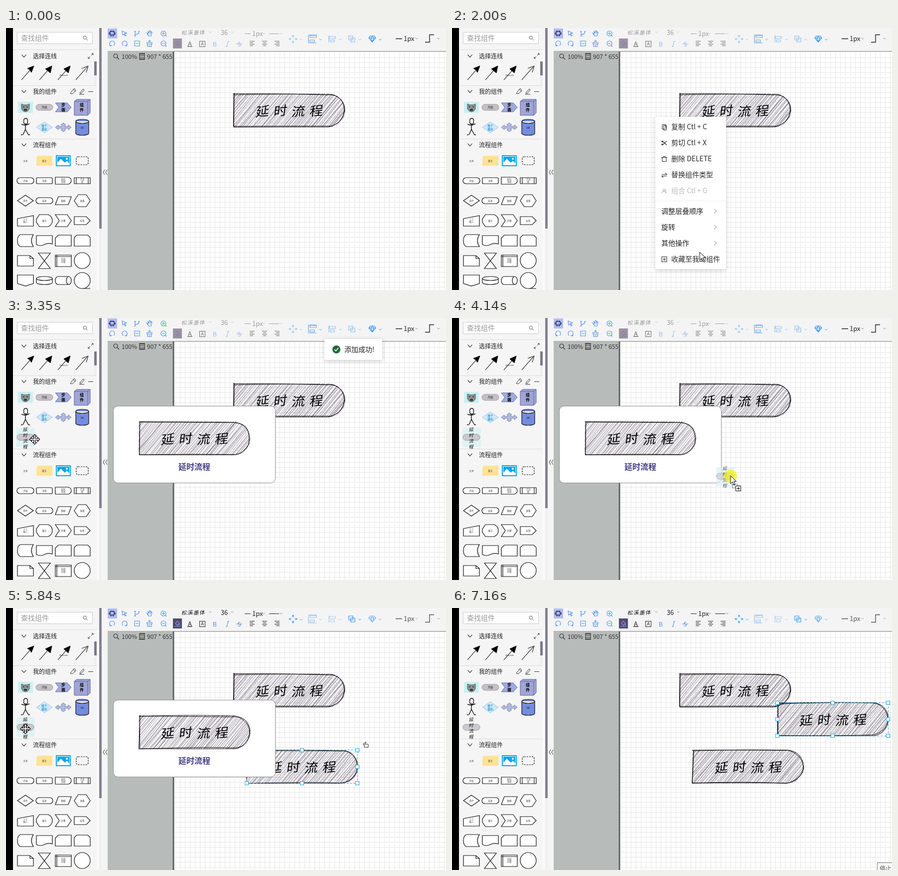
Animation of 883 by 525 pixels, one loop 7240 ms. Source, as an HTML page with a canvas:

```html
<!DOCTYPE html>
<html lang="zh">
<head>
<meta charset="utf-8">
<title>流程图编辑器</title>
<style>
html, body { margin: 0; width: 100%; height: 100%; overflow: hidden; background: #fff; }
canvas { display: block; width: 883px; height: 525px; }
</style>
</head>
<body>
<canvas id="stage" width="883" height="525"></canvas>
<script>
const c = document.getElementById('stage').getContext('2d');
const LOOP = 7240, STEP = 132.5;
const SANS = '"Noto Sans CJK SC", "Noto Sans CJK", "Open Sans", sans-serif';
const BLUE = '#4b8fea', INK = '#222';

function rng(seed) {
  let s = seed * 7919 % 2147483647;
  const next = () => (s = s * 16807 % 2147483647) / 2147483647;
  next(); next();
  return next;
}

function rect(x, y, w, h, fill, stroke) {
  if (fill) { c.fillStyle = fill; c.fillRect(x, y, w, h); }
  if (stroke) { c.strokeStyle = stroke; c.lineWidth = 1; c.strokeRect(x + .5, y + .5, w - 1, h - 1); }
}

function path(d, x, y, stroke, width = 1, fill, scale = 1) {
  const p = new Path2D(d);
  c.save();
  c.translate(x, y);
  c.scale(scale, scale);
  if (fill) { c.fillStyle = fill; c.fill(p); }
  if (stroke) { c.strokeStyle = stroke; c.lineWidth = width; c.stroke(p); }
  c.restore();
}

function text(s, x, y, size, color = INK, align = 'left', weight = 300) {
  c.font = `${weight} ${size}px ${SANS}`;
  c.fillStyle = color;
  c.textAlign = align;
  c.textBaseline = 'middle';
  c.fillText(s, x, y);
}

function brushText(s, x, y, size, pitch, color = '#000', weight = 500) {
  [...s].forEach((ch, i) => {
    c.save();
    c.translate(x + i * pitch, y + (i % 2 ? -1 : 1) * size * .02);
    c.transform(1, -.1, -.12, .94, 0, 0);
    text(ch, 0, 0, size, color, 'center', weight);
    c.restore();
  });
}

function faded(alpha, draw) {
  c.save();
  c.globalAlpha *= alpha;
  draw();
  c.restore();
}

function shadowBox(x, y, w, h, radius) {
  c.save();
  c.shadowColor = 'rgba(0,0,0,.2)';
  c.shadowBlur = 10;
  c.shadowOffsetY = 2;
  c.fillStyle = '#fff';
  c.beginPath();
  c.roundRect(x, y, w, h, radius);
  c.fill();
  c.restore();
}

const chevron = (x, y, color = '#888', s = 1) => path('M-2.5-1.2L0 1.3L2.5-1.2', x, y, color, 1, null, s);
const lens = (x, y, s = 1, color = '#444') =>
  path('M3-1A4 4 0 1 1-5-1A4 4 0 1 1 3-1M2 2L6 6', x, y, color, 1.2, null, s);

// Hand-drawn delay shape, 222 x 66
function sketch(x, y, seed) {
  const r = rng(seed), j = n => (r() - .5) * n;
  c.save();
  c.translate(x, y);
  c.save();
  c.clip(new Path2D('M-1-1H190C209-1 224 14 224 33S209 67 190 67H-1Z'));
  c.strokeStyle = '#5a4d63';
  for (let k = -62; k < 224; k += 4.4) {
    for (let pass = 0; pass < 2; pass++) {
      const a = k + j(5), b = k + 57 + j(5);
      c.globalAlpha = .4 + r() * .35;
      c.lineWidth = .6 + r() * .5;
      c.beginPath();
      c.moveTo(a, 67);
      c.quadraticCurveTo((a + b) / 2 + j(3), 33 + j(3), b, -1);
      c.stroke();
    }
  }
  c.restore();
  c.strokeStyle = '#000';
  c.lineWidth = .9;
  for (let pass = 0; pass < 2; pass++) {
    c.beginPath();
    c.moveTo(j(2), 1 + j(4));
    c.quadraticCurveTo(90 + j(40), j(6), 189 + j(4), 1 + j(3));
    c.bezierCurveTo(207 + j(8), j(4), 222, 15 + j(6), 222 + j(2), 33 + j(5));
    c.bezierCurveTo(222, 51 + j(6), 206 + j(8), 65, 189 + j(6), 65 + j(3));
    c.quadraticCurveTo(100 + j(40), 64 + j(6), j(3), 66 + j(2));
    c.lineTo(1 + j(3), j(3));
    c.stroke();
  }
  c.restore();
  brushText('延时流程', x + 58, y + 34, 27, 36);
}

function dashBox(x, y, color) {
  c.save();
  c.setLineDash([4, 3]);
  rect(x - 1, y - 1, 224, 68, null, color);
  c.restore();
}

function selection(x, y) {
  dashBox(x, y, '#33a0d8');
  for (const dx of [0, 111, 222]) for (const dy of [0, 33, 66])
    if (dx !== 111 || dy !== 33) rect(x + dx - 4, y + dy - 4, 8, 8, '#fff', '#12a9ee');
  path('M-3-1H5V5H-3ZM-5 1Q-6-5 1-4M-1-6L1-4L-1-2', x + 239, y - 11, '#333');
}

const PILL = 'M-11-6H11A6 6 0 0 1 11 6H-11A6 6 0 0 1-11-6Z';
const ARROWS = 'M-16 0L-10-5V-2H-3V-5H-5L0-9L5-5H3V-2H10V-5L16 0L10 5V2H3V5H5L0 9L-5 5H-3V2H-10V5Z';
const STEP_SHAPE = 'M-16-9H8L16 0L8 9H-16L-9 0Z';
const CIRCLE = 'M-16 0A16 16 0 1 1 16 0A16 16 0 1 1-16 0';

const flowShapes = [
  [PILL, '开始'],
  ['M-14-6H14Q16-6 16-4V4Q16 6 14 6H-14Q-16 6-16 4V-4Q-16-6-14-6Z', '流程'],
  ['M-16-7H9A7 7 0 0 1 9 7H-16Z', '延时/流程'],
  ['M-16-6H16V6H-16ZM-12-6V6M12-6V6', '子流/程'],
  ['M-16 0L0-11L16 0L0 11Z', '条件'],
  [PILL, '结束'],
  ['M-10-8H16L10 8H-16Z', '数据'],
  ['M-16 0L-8-12H8L16 0L8 12H-8Z', '准备'],
  ['M-16-4L16-10V11H-16Z', '人工/输入'],
  ['M-10-12H8Q16-8 16 0T8 12H-10L-16 3V-3Z', '展示'],
  ['M-16-12H8L16 0L8 12H-16L-8 0Z', '步骤'],
  ['M-16-8H8L16 0L8 8H-16Z', '标签'],
  ['M-10-12H16Q8 0 16 12H-10Q-16 10-16 0T-10-12Z'],
  ['M-16-10H16V7Q8 4 0 8T-16 8Z'],
  ['M-10-11H16V11H-16V-5Z'],
  ['M-11-11H11L16-6V11H-16V-6Z'],
  ['M-16-10H9L16-4V11H-16ZM9-10V-4H16'],
  ['M-12-15H12L-12 16H12Z'],
  ['M-16-11H16V12H-16ZM-16-8H16M-13-11V12', '内部/存储'],
  [CIRCLE],
  ['M-16-11H16V6L0 11L-16 6Z'],
  ['M-16-4A16 4 0 0 1 16-4V4A16 4 0 0 1-16 4ZM-16-4A16 4 0 0 0 16-4'],
  ['M-11-8H11A5 8 0 0 1 11 8H-11A5 8 0 0 1-11-8M11-8A5 8 0 0 0 11 8'],
  [CIRCLE + 'M0 16H16']
];

function tinyLabel(label, x, y) {
  const rows = label.split('/');
  rows.forEach((s, i) => text(s, x, y + (i - (rows.length - 1) / 2) * 5.5, 4.5, '#444', 'center', 400));
}

function section(title, y) {
  path('M-4.5-2.5L0 2.5L4.5-2.5', 36, y, '#444', 1.2);
  text(title, 54, y, 12, '#222', 'left', 400);
}

function addedItem(dx = 0, dy = 0) {
  path(PILL, 39 + dx, 239 + dy, '#999', 1, '#ccc9cf');
  [...'延时流程'].forEach((ch, i) => brushText(ch, 39 + dx, 223 + dy + i * 11.6, 9.5, 0, '#111', 400));
}

function myComponents() {
  rect(24, 148, 30, 22, '#c9f0f1');
  path('M-8-7L-4-5H4L8-7L8 3Q5 9 0 9T-8 3Z', 39, 159, '#555', 1, '#8b9494');
  path('M-5-1H-2M2-1H5M-2 4H2V6H-2Z', 39, 159, '#222', 1.5);
  path(PILL, 77, 159, '#999', 1, '#c5c0c8');
  text('开始', 77, 159, 5.5, '#222', 'center', 500);
  path(STEP_SHAPE, 115, 159, '#6570b8', 1, '#a2aadb');
  text('步', 115, 154, 8, '#000', 'center', 700);
  text('骤', 115, 164, 8, '#000', 'center', 700);
  path('M-16-12L-11-16H16V11L11 16H-16ZM-16-12H11V16M11-12L16-16', 153, 159, '#5c629f', 1, '#a0a5d5');
  text('组', 152, 154, 8, '#000', 'center', 700);
  text('件', 152, 164, 8, '#000', 'center', 700);
  path('M-3-12A4 4 0 1 0 4-12A4 4 0 1 0-3-12M0-8V4M-8-6L0-4L8-7M-5 15L0 4L6 15M-6 15H-9M6 15H9', 39, 199, '#111', 1.4);
  path('M-16 0L0-11L16 0L0 11Z', 77, 199, '#9cc4e6', 1, '#d3e8f6');
  text('给个', 77, 196, 5.5, '#168fd0', 'center', 700);
  text('提示', 77, 203, 5.5, '#168fd0', 'center', 700);
  path(ARROWS, 115, 199, '#7d88b4', 1, '#b3bbdc');
  path('M-13-12A13 4 0 0 1 13-12V12A13 4 0 0 1-13 12ZM-13-12A13 4 0 0 0 13-12', 153, 199, '#111', 1.2, '#748ce0');
  text('DB', 153, 200, 4.5, '#111', 'center', 500);
}

function sidebar(added, highlighted) {
  rect(0, 0, 14, 525, '#000');
  rect(14, 0, 173, 525, '#f5f5f5');
  rect(182, 44, 5, 481, '#fafafa');
  rect(187, 0, 5, 525, '#f0f0f2');
  rect(187, 0, 5, added ? 381 : 402, '#858290');
  rect(192, 0, 12, 525, '#f5f5f6');
  path('M-1-5L-4 0L-1 5M4-5L1 0L4 5', 199, 289, '#333');

  rect(22, 8, 152, 24, '#fff', '#ccc');
  text('查找组件', 30, 20, 14, '#999');
  lens(159, 20, .8, '#555');
  rect(14, 43, 168, 1, '#ddd');
  section('选择连线', 56);
  path('M1-1L5-5M2-5H5V-2M-1 1L-5 5M-5 2V5H-2', 170, 56, '#333');
  [43, 79, 116, 152].forEach((x, i) => {
    path('M-12 14L11-12', x, 90, '#000', 1.1);
    const heads = ['M13-14L8-1L5-6L0-9Z', 'M13-14L10 0L0-8Z', 'M13-14L9 0L0-8Z', 'M0-9L13-14L9-1'];
    path(heads[i], x, 90, '#000', 1, i < 3 ? '#000' : null);
  });
  text('Bottom/In', 116, 95, 3.5, '#111', 'center', 500);
  rect(177, 67, 5, 48, '#eee');
  rect(177, 67, 5, 28, '#7d7a87');
  rect(14, 115, 168, 1, '#ddd');

  section('我的组件', 127);
  path('M-5 4L1-4L5 0L-1 5ZM1-4L3-6L6-2L5 0', 134, 127, '#333');
  path('M-3 2L3-5L5-3L-1 4L-4 4ZM-5 6H5', 152, 127, '#333');
  path('M-5 .5H5', 170, 127, '#333');
  myComponents();
  const shift = added ? 40 : 0;
  if (added) {
    if (highlighted) rect(21, 220, 37, 38, '#e0f2f3');
    c.save();
    c.beginPath(); c.rect(14, 216, 168, 46); c.clip();
    addedItem();
    c.restore();
  }
  rect(14, 222 + shift, 168, 1, '#ddd');

  section('流程组件', 234 + shift);
  const y = 266 + shift;
  tinyLabel('文本', 39, y);
  path('M-13-10H16V10H-16V-7Z', 77, y, null, 1, '#ffe295');
  tinyLabel('备注', 77, y);
  rect(100, y - 11, 30, 22, '#08a5ed');
  rect(102, y - 9, 26, 18, null, '#fff');
  path('M-12 8V4L-5-4L3 4L7 0L12 5V8ZM7-6A2 2 0 1 0 7-2A2 2 0 1 0 7-6', 115, y, null, 1, '#fff');
  c.save();
  c.setLineDash([3, 2]);
  path('M-8-8H8Q12-8 12-4V4Q12 8 8 8H-8Q-12 8-12 4V-4Q-12-8-8-8', 153, y, '#111', 1.2);
  c.restore();
  flowShapes.forEach(([d, label], i) => {
    const sx = 39 + i % 4 * 38, sy = y + 40 + Math.floor(i / 4) * 40;
    path(d, sx, sy, '#111', 1.2, '#fff');
    if (label) tinyLabel(label, sx, sy);
  });
}

function toolbar(active) {
  rect(204, 0, 679, 46, '#f4f4f4');
  rect(203, 1, 20, 20, '#b1bdf2');
  path('M-4-4H4V3H-4ZM-2-4V-6M2-4V-6M-2 3V6M2 3V6M-6-2V2M6-2V2', 213, 11, '#2d3560', 1.5);
  const zoom = 'M5 0A5 5 0 1 1-5 0A5 5 0 1 1 5 0M3 3L6 6M-3 0H3';
  const icons = [
    ['M-4-5L5-1L1 0L4 4L2 5L0 1L-3 3Z', 237, 11], ['M-4-5V5M-4 2Q4 2 4-4M-6-4H-2M2-4H6M-6 5H-2', 263, 11],
    ['M-5 0L-2 5H3L5-2L3-4L2-1V-5L0-6L-1-1L-3-4V2Z', 288, 11], [zoom + 'M0-3V3', 316, 11],
    ['M-3 4A5 5 0 1 1 3 4M-5 1L-4 5L0 4', 213, 31], ['M3 4A5 5 0 1 0-3 4M5 1L4 5L0 4', 238, 31],
    ['M-5-5H5V5H-5ZM-3 0H3', 263, 31], ['M-1-6H1V-2H5V1H-5V-2H-1ZM-4 1V6H4V1M0 3V6', 288, 31],
    [zoom, 316, 31]
  ];
  for (const [d, x, y] of icons) path(d, x, y, BLUE, 1.1);

  faded(active ? 1 : .4, () => {
    brushText('松溪墨体', 358, 9, 11, 12, '#111', 500);
    text('36', 431, 9, 12.5, '#111', 'left', 400);
    text('1px', 494, 11, 13, '#222');
    path('M479 11.5H491M528 11.5H548', 0, 0, '#222', 1.2);
    chevron(410, 8); chevron(454, 8); chevron(517, 11); chevron(552, 11);
  });
  rect(335, 21, 18, 20, active ? '#54486b' : '#9c929f');
  path('M-4 0L0-5L4 0L0 4ZM-6 6H6M4 1L5 4', 344, 31, active ? '#79a6f5' : '#7e83b5', 1.2);
  faded(active ? 1 : .65, () => {
    text('A', 369, 31, 12, '#111', 'center', 400);
    path('M-5 6H5', 369, 31, '#111', 1.3);
    rect(388, 26, 12, 12, null, '#222');
    text('A', 394, 32, 9, '#111', 'center', 400);
    path('M-5-4H5M-5-1H2M-5 2H5M-5 5H2', 494, 30.5, '#222');
    path('M-5-4H5M-3-1H3M-5 2H5M-3 5H3', 519, 30.5, '#222');
    path('M-5-4H5M-2-1H5M-5 2H5M-2 5H5', 544, 30.5, '#222');
  });
  faded(active ? 1 : .55, () => {
    text('B', 419, 32, 12, BLUE, 'center', 500);
    path('M-1 5L2-5M-3 5H1M0-5H4', 444, 32, BLUE);
    text('S', 468, 32, 12, BLUE, 'center', 400);
    path('M-6 0H6', 468, 32, BLUE);
  });

  const groups = [
    ['M-7 0H-3M7 0H3M0-7V-3M0 7V3M-5-2L-8 0L-5 2M5-2L8 0L5 2M-2-5L0-8L2-5M-2 5L0 8L2 5', 576, .45, .9],
    ['M-8-8V8M-5-7H8V-3H-5ZM-5 2H4V6H-5ZM-8-8H8M-8 8H8', 615, .75, .5],
    ['M-6-5H6V-1H-6ZM-4 2H4V6H-4ZM-7-7V7', 655, .5, .35],
    ['M-6-6H2V2H-6ZM-2-2H6V6H-2Z', 694, .55, 1],
    ['M-4-6H4L7-2L0 6L-7-2ZM-7-2H7M-3-2L0 6L3-2M-3-2L0-6L3-2', 735, 1, .65]
  ];
  for (const [d, x, off, on] of groups) faded(active ? on : off, () => {
    path(d, x, 22, '#3192ea', 1.2);
    chevron(x + 16, 23, '#3192ea');
  });
  faded(active ? .75 : 1, () => {
    path('M782 21.5H795M841 28.5H850V13.5H859', 0, 0, '#222', 1.4);
    text('1px', 798, 21, 13, '#222', 'left', 400);
    chevron(824, 21); chevron(868, 21);
  });
}

function workspace() {
  rect(204, 46, 679, 479, '#b7bcbb');
  rect(334, 46, 1, 479, '#979b9a');
  rect(335, 46, 2, 479, '#5c5f5f');
  rect(337, 46, 1, 479, '#a8abab');
  rect(338, 48, 545, 477, '#fff');
  c.fillStyle = '#e6e6e6';
  for (let x = 349; x < 883; x += 10) c.fillRect(x, 49, 1, 476);
  for (let y = 59; y < 525; y += 10) c.fillRect(339, y, 544, 1);
  rect(204, 46, 679, 1, '#b0b0b0');
  lens(221, 57, 1, '#333');
  text('100%', 232, 57, 12, '#333', 'left', 400);
  path('M-5-5H5V5H-5ZM-5-2H5M-5 2H5M-6-6H6M-6 6H6', 273, 57, '#333', 1.1);
  text('907 * 655', 283, 57, 12, '#333', 'left', 400);
}

function contextMenu() {
  shadowBox(408, 178, 142, 305, 2);
  const rows = [
    ['复制 Ctl + C', 198, 'M-4-5H3V3M-4-5V4H1M-1-3H4V6H-1Z'], ['剪切 Ctl + X', 230, 'M-4-4L5 4M-4 4L5-4M-5-4H-3V-2H-5ZM-5 2H-3V4H-5Z'],
    ['删除 DELETE', 262, 'M-4-3V5H4V-3M-6-3H6M-2-3V-5H2V-3'], ['替换组件类型', 294, 'M-5-1H5L2-4M5 2H-5L-2 5'],
    ['组合 Ctl + G', 326, 'M-5 5Q-5 1-1 1T3 5M-3-2A2 2 0 1 0 1-2A2 2 0 1 0-3-2M2-4Q5-2 2 0L5 4'],
    ['收藏至我的组件', 463, 'M-5-5H5V5H-5ZM-3 0H3M0-3V3']
  ];
  for (const [label, y, d] of rows) {
    const color = y === 326 ? '#bbb' : '#2a2a2a';
    path(d, 426, y + .5, color, 1.1);
    text(label, 440, y, 14, color);
  }
  rect(408, 346, 142, 1, '#eee');
  ['调整层叠顺序', '旋转', '其他操作'].forEach((s, i) => {
    text(s, 420, 367 + i * 32, 14);
    path('M-2-4L3 0L-2 4', 528, 367 + i * 32, '#888');
  });
}

function preview(y, seed) {
  c.beginPath();
  c.roundRect(215.5, y + .5, 325, 154, 9);
  c.fillStyle = '#fff';
  c.fill();
  c.strokeStyle = '#8c8c8c';
  c.lineWidth = 1;
  c.stroke();
  sketch(267, y + 32, seed);
  text('延时流程', 378, y + 122, 16, '#443f86', 'center', 700);
}

function toast(alpha) {
  faded(alpha, () => {
    shadowBox(639, 42 - (1 - alpha) * 8, 116, 42, 2);
    path('M8 0A8 8 0 1 1-8 0A8 8 0 1 1 8 0', 663, 63, null, 1, '#1d6b33');
    path('M-4 0L-1 3L4-3', 663, 63, '#fff', 1.6);
    text('添加成功!', 679, 63, 14, '#222');
  });
}

// Pointer stops: step, x, y
const route = [
  [1, 822, 490], [2, 790, 450], [6, 550, 175], [8, 550, 175], [9, 545, 192], [13, 500, 448], [15, 497, 449],
  [16, 510, 461], [17, 502, 448], [20, 388, 338], [22, 230, 288], [24, 60, 245], [28, 50, 238], [29, 110, 246],
  [31, 559, 316], [33, 594, 318], [35, 590, 330], [37, 470, 365], [39, 237, 285], [40, 90, 262], [42, 39, 242],
  [44, 39, 242], [45, 300, 240], [46, 718, 230], [47, 764, 223], [50, 800, 340], [52, 848, 490], [53, 865, 512]
];

function pointerAt(n) {
  const i = Math.max(0, route.findIndex(k => k[0] >= n) - 1);
  const [n0, x0, y0] = route[i], [n1, x1, y1] = route[i + 1];
  const p = (n - n0) / (n1 - n0);
  return [x0 + (x1 - x0) * p, y0 + (y1 - y0) * p];
}

const within = (n, a, b) => n >= a && n <= b;

function pointer(n) {
  if (!within(n, 1, 53)) return;
  const [x, y] = pointerAt(n);
  const dragging = within(n, 29, 33) || within(n, 45, 46);
  if (dragging) {
    faded(.65, () => {
      rect(x - 29, y - 17, 37, 38, '#d9eff1');
      addedItem(x - 50, y - 238);
    });
  }
  if (dragging || n === 16) path('M13 0A13 13 0 1 1-13 0A13 13 0 1 1 13 0', x, y + 1, null, 1, 'rgba(246,240,20,.72)');
  if (within(n, 5, 8) || within(n, 24, 28) || within(n, 42, 44)) {
    path('M0-10L4-6H1.5V-1.5H6V-4L10 0L6 4V1.5H1.5V6H4L0 10L-4 6H-1.5V1.5H-6V4L-10 0L-6-4V-1.5H-1.5V-6H-4Z', x, y, '#000', 1.2, '#fff');
    return;
  }
  const blurred = within(n, 18, 22);
  if (blurred) path('M0 0V17L4 13L7 20L10 19L7 12H13Z', x, y, 'rgba(110,110,110,.75)', 4, '#111', 1.05);
  else path('M0 0V16L4 12.5L6.5 19L9 18L6.5 11.5H11.5Z', x, y, '#000', 1, '#fff');
  if (dragging) {
    const bx = Math.round(x), by = Math.round(y);
    c.save();
    c.setLineDash([1, 1]);
    rect(bx + 3, by + 17, 12, 8, null, '#000');
    c.restore();
    rect(bx + 10, by + 20, 11, 11, '#fff', '#000');
    path('M-3 0H3M0-3V3', bx + 15.5, by + 25.5, '#000');
  }
}

function draw(t) {
  const n = Math.floor(t / STEP);
  c.clearRect(0, 0, 883, 525);
  workspace();
  const hover = within(n, 6, 8);
  sketch(457, 132, hover ? 23 : 11);
  if (hover) dashBox(457, 132, '#22aee8');
  if (n >= 34) sketch(483, 285, within(n, 40, 52) ? 47 : 31);
  if (within(n, 40, 52)) selection(483, 285);
  if (n >= 47) sketch(653, 190, 59);
  if (n >= 53) selection(653, 190);
  toolbar(n >= 40);
  sidebar(n >= 18, within(n, 24, 33) || within(n, 42, 45));
  if (within(n, 8, 16)) contextMenu();
  if (within(n, 25, 40)) preview(176, 71);
  if (within(n, 42, 45)) preview(184, 83);
  if (within(n, 18, 28)) toast(Math.min(1, (n - 17) / 2));
  pointer(n);
  if (n >= 54) {
    rect(853, 510, 40, 20, '#fff', '#767676');
    text('停止', 858, 522, 12, '#444', 'left', 400);
  }
}

const start = performance.now();
function tick() {
  draw((performance.now() - start) % LOOP);
  requestAnimationFrame(tick);
}
tick();
</script>
</body>
</html>
```
